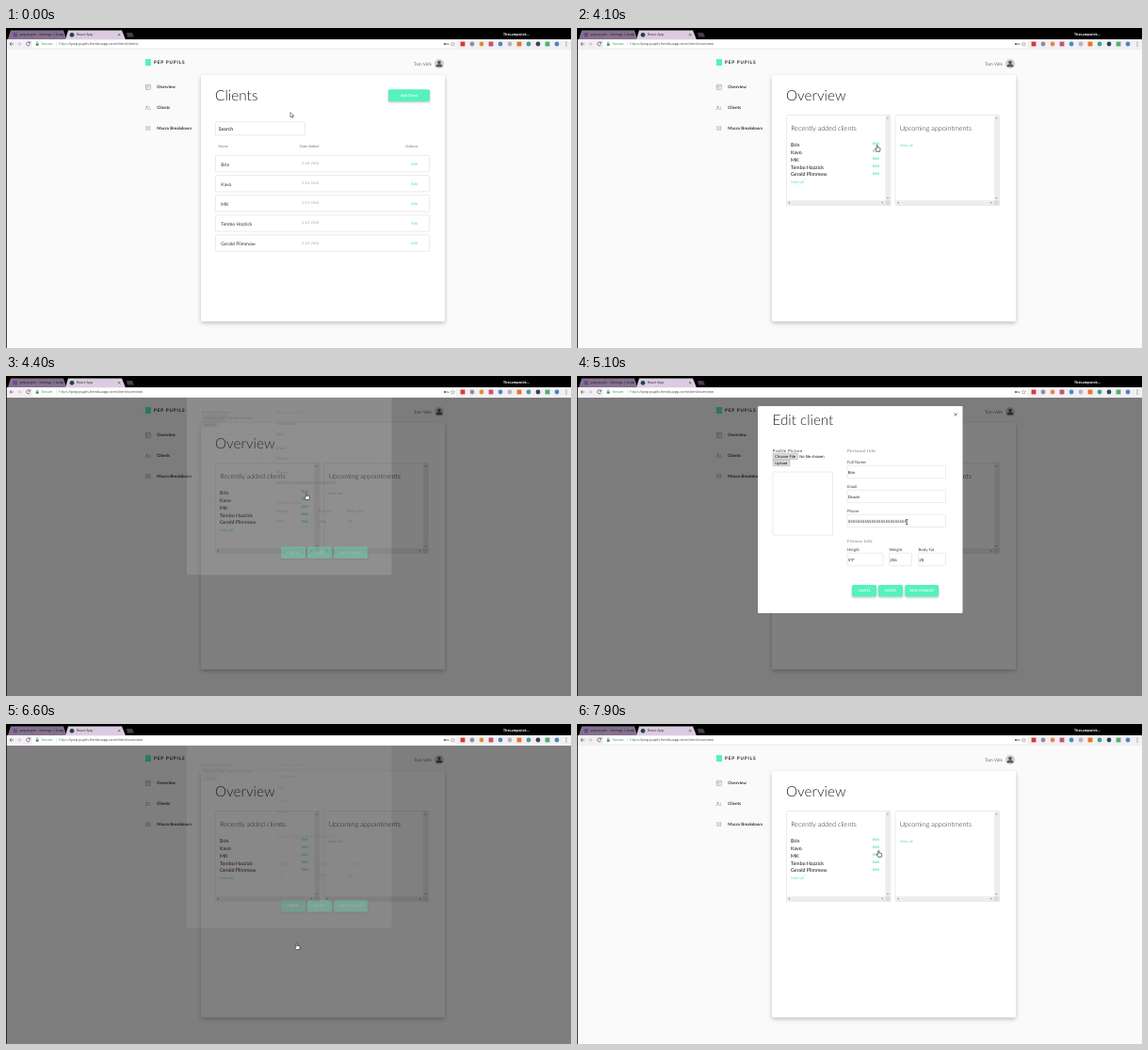
Recreate the animation shown at these times as an HTML page. Size 600x340 px, loop 8000 ms.

```html
<!DOCTYPE html>
<html lang="en">
<head>
<meta charset="utf-8">
<title>Client manager</title>
<style>
  html, body { margin: 0; width: 100%; height: 100%; overflow: hidden; background: #fafafa; }
  svg { display: block; width: 600px; height: 340px; }
  text { font-family: Lato, sans-serif; text-rendering: geometricPrecision; white-space: pre; }
  .ui { font-family: "Open Sans", sans-serif; }
  .native { font-family: "Liberation Sans", Arial, sans-serif; }
</style>
</head>
<body>
<svg id="stage" viewBox="0 0 600 340" xmlns="http://www.w3.org/2000/svg"></svg>
<script>
const TEAL = '#55f2bc', LINK = '#4fe0b4', INK = '#333', LINE = '#e6e6e6';
const LOOP = 8000;

// y is the vertical middle of the capitals
const text = (s, x, y, size, fill = INK, weight = 400, extra = '') =>
  `<text x="${x}" y="${y + size * 0.36}" font-size="${size}" fill="${fill}" font-weight="${weight}" ${extra}>${s}</text>`;
const rect = (x, y, w, h, fill, extra = '') =>
  `<rect x="${x}" y="${y}" width="${w}" height="${h}" fill="${fill}" ${extra}/>`;
const box = (x, y, w, h, fill = '#fff') =>
  rect(x, y, w, h, fill, `stroke="${LINE}" stroke-width=".8" rx=".8"`);
const path = (d, stroke, width = 0.7, fill = 'none') =>
  `<path d="${d}" fill="${fill}" stroke="${stroke}" stroke-width="${width}"/>`;
const circle = (x, y, r, fill) => `<circle cx="${x}" cy="${y}" r="${r}" fill="${fill}"/>`;
const group = (id, body, extra = '') => `<g id="${id}" ${extra}>${body}</g>`;
const middle = 'text-anchor="middle"';

const button = (label, x, y, w, h, size, id = '') =>
  rect(x, y, w, h, TEAL, `id="${id}" rx="1.5" filter="url(#soft)"`) +
  text(label, x + w / 2, y + h / 2, size, '#fff', 700, middle);

const people = [
  ['Brin', '2-28-2018'], ['Kavo', '4-10-2018'], ['MK', '3-13-2018'],
  ['Tembo Hazzick', '3-12-2018'], ['Gerald Plimmow', '3-20-2018']
];

function browser() {
  const extensions = ['#d33a3a', '#8f8f9c', '#e58a3c', '#c0566b', '#3f8fc8', '#b9b3bd', '#e0782c',
    '#3aa58c', '#2b4b52', '#53b06a', '#4c84c4'];
  return rect(0, 0, 600, 12, '#000') +
    path('M2 12L5 2.5H61L64 12Z', 'none', 0, '#85718e') +
    path('M63 12.5L66 2.5H123L127 12.5Z', 'none', 0, '#dccbe0') +
    rect(7.5, 5, 4.5, 4.5, '#6a4a96') + circle(70, 7.3, 2.4, '#21454c') +
    text('pep-pupils - Settings | Kum', 14.5, 7.2, 3.6, '#1d1722', 400, 'class="ui"') +
    text('React App', 75, 7.2, 3.6, '#222', 400, 'class="ui"') +
    path('M58.6 6l2.4 2.4m0-2.4l-2.4 2.4M119 6l2.4 2.4m0-2.4l-2.4 2.4', '#333', 0.5) +
    path('M129 9.5L128 5H134L136 9.5Z', 'none', 0, '#493d4e') +
    text('TheLampwick...', 528, 6.8, 3.6, '#fff', 700, 'class="ui"') +
    rect(0, 12, 600, 11, '#f3eff4') + rect(28, 13, 450, 8.5, '#fff', 'rx="1"') +
    path('M8 17H4m1.8-1.8L4 17l1.8 1.8', '#555') +
    path('M12 17h4m-1.8-1.8L16 17l-1.8 1.8', '#bbb') +
    path('M25.3 15.7a2 2 0 1 0 .2 2M25.6 14.5v1.7h-1.7', '#555') +
    rect(31.8, 16.5, 2.8, 2.2, '#2a9150') + path('M32.4 16.5v-1a.8.8 0 0 1 1.6 0v1', '#2a9150', 0.5) +
    text('Secure', 37.5, 17, 3.8, '#2a9150', 400, 'class="ui"') + rect(53.2, 14.5, 0.4, 5, '#ccc') +
    `<text id="url" class="ui" x="56.3" y="18.4" font-size="3.8" fill="#444"><tspan fill="#2a9150">https</tspan><tspan>://pep-pupils.herokuapp.com/client/</tspan><tspan id="route"></tspan></text>` +
    circle(466, 17, 1.1, '#555') + path('M467 17h3v1', '#555') +
    path('M474.5 14.8l.7 1.5 1.6.2-1.2 1.1.3 1.6-1.4-.8-1.4.8.3-1.6-1.2-1.1 1.6-.2Z', '#666', 0.4) +
    extensions.map((c, i) => i % 3 ? circle(485 + i * 10, 17, 2.4, c) : rect(482.6 + i * 10, 14.6, 4.8, 4.8, c)).join('') +
    [15, 17, 19].map(y => circle(595, y, 0.6, '#666')).join('');
}

function siteFrame() {
  return rect(0, 23, 600, 317, '#fafafa') +
    rect(148, 33, 6, 7, TEAL) +
    text('PEP PUPILS', 157, 36.2, 4.8, '#222', 700, 'letter-spacing=".75"') +
    text('Tam Velk', 452, 38.2, 4.9, '#777', 400, 'text-anchor="end"') +
    circle(460, 38, 5, '#cfcfcf') + circle(460, 36.6, 1.8, '#555') + path('M456.5 41.2a3.5 3 0 0 1 7 0Z', 'none', 0, '#555') +
    path('M148.4 60.3h5v5h-5Zm0 1.7h5m-3.3 0v3.3', '#999', 0.6) +
    path('M148 87v-.8q1.5-1.6 3 0v.8m.7-.8q1-.7 1.8.2v.6', '#999', 0.6) +
    circle(149.5, 83.7, 0.9, '#999') + circle(152.2, 84, 0.7, '#aaa') +
    path('M149 104v5m1.9-5v5m1.9-5v5', '#aaa', 0.8) +
    text('Overview', 160.3, 62.6, 4.5, INK, 700, 'id="overviewLink"') +
    text('Clients', 160.3, 84.7, 4.5, INK, 700) +
    text('Macro Breakdown', 160.3, 106.7, 4.5, INK, 700) +
    rect(207, 50, 259, 261.5, '#fff', 'rx="1.5" filter="url(#card)"');
}

function clientsPage() {
  const rows = people.map(([name, date], i) => {
    const y = 135.5 + i * 21.1;
    return box(222.5, y, 227, 17.3) + text(name, 228.3, y + 9.3, 5.05) +
      text(date, 314, y + 8.3, 3.8, '#aaa') + text('Edit', 430.2, y + 8.6, 4, LINK);
  }).join('');
  return text('Clients', 222, 71.3, 15.4, '#222', 300) +
    button('Add Client', 406, 65.3, 44, 12.7, 3.9) +
    box(222.5, 99.8, 95, 14) + text('Search', 225.8, 107, 5.1, '#444', 700) +
    text('Name', 225.5, 126, 3.9, '#999', 700) + text('Date Added', 312, 126, 3.9, '#999', 700) +
    text('Actions', 424.3, 126, 3.9, '#999', 700) + rows;
}

function panel(x, w, title) {
  const right = x + w - 5.7, arrow = '#777';
  return box(x, 92.5, w, 96) + rect(right, 92.8, 5.4, 90.4, '#ededed') +
    rect(x + 0.3, 183.2, w - 6, 5.1, '#ededed') + rect(right, 183.2, 5.4, 5.1, '#dcdcdc') +
    path(`M${right + 1.6} 96.2l1.1-1.3 1.1 1.3Zm0 84l1.1 1.3 1.1-1.3Z`, 'none', 0, arrow) +
    path(`M${x + 3.5} 184.6l-1.3 1.1 1.3 1.1ZM${right - 3.5} 184.6l1.3 1.1-1.3 1.1Z`, 'none', 0, arrow) +
    text(title, x + 4.7, 106.6, 7.25, '#222', 300);
}

function overviewPage() {
  const list = people.map(([name], i) =>
    text(name, 227, 124.2 + i * 7.8, 5.3, '#222', 500) +
    text('Edit', 314, 122.8 + i * 7.9, 4, LINK, 700)).join('');
  return text('Overview', 222, 71.3, 15.3, '#222', 300) +
    panel(222.5, 110.5, 'Recently added clients') + panel(338, 110.5, 'Upcoming appointments') +
    text('View all', 342.8, 124.2, 4, LINK) +
    group('recent', list + text('View all', 227, 163.2, 4, LINK));
}

function field(label, value, x, y, w) {
  return text(label, x, y, 4.4, '#444') + box(x, y + 4.2, w, 13.4) + text(value, x + 0.7, y + 11.4, 4.3, '#222');
}

function modalBody() {
  const spaced = 'letter-spacing=".35"', native = 'class="native"';
  const grey = (x, y, w, h) => rect(x, y, w, h, '#ddd', 'stroke="#999" stroke-width=".4"');
  return rect(192, 32, 217.5, 220, '#fff', 'rx="1.2"') +
    text('Edit client', 207.5, 46.5, 15.2, '#222', 300) +
    path('M400.6 39.4l3 3m0-3l-3 3', '#333', 0.6) +
    text('Profile Picture', 207.8, 79, 4.3, INK, 400, spaced) +
    grey(208, 82, 26.5, 6.5) + text('Choose File', 210, 85.2, 4.15, '#111', 400, native) +
    text('No file chosen', 236.3, 85.2, 4.15, '#111', 400, native) +
    grey(208, 89.2, 18, 6.3) + text('Upload', 210.3, 92.3, 4.15, '#111', 400, native) +
    box(208, 102, 63.5, 67) +
    text('Personal Info', 287, 79, 4.4, '#999', 700, spaced) +
    field('Full Name:', 'Brin', 287, 91, 104.5) +
    field('Email', 'Drovin', 287, 117, 104.5) +
    field('Phone', '5'.repeat(25), 287, 143, 104.5) +
    text('Fitness Info', 287, 175, 4.4, '#999', 700, spaced) +
    field('Height', '5\'9"', 287, 184, 38) + field('Weight', '206', 331.5, 184, 24) + field('Body Fat', '28', 362.5, 184, 29);
}

const modalButtons = button('CANCEL', 292, 222, 26, 12.5, 3.4, 'cancel') +
  button('DELETE', 320, 222, 26, 12.5, 3.4) + button('SAVE CHANGES', 348.3, 222, 35.7, 12.5, 3.4);

const cursors =
  group('arrow', path('M0 0V5.2L1.3 4.1 2.1 6 3 5.6 2.2 3.8H3.8Z', '#222', 0.5, '#fff')) +
  group('hand', path('M-.6 3.6V.5Q0-.4.6.5V2.6L3 3.1Q3.5 3.3 3.4 4L2.9 6.9H-.4L-2.3 4.2Q-1.7 3.2-.6 4.2Z', '#111', 0.6, '#fff')) +
  group('beam', path('M-1.2-2.5H1.2M0-2.5V2.5M-1.2 2.5H1.2', '#222', 0.6));

document.getElementById('stage').innerHTML = `
  <defs>
    <filter id="card" x="-10%" y="-10%" width="120%" height="120%"><feDropShadow dx="0" dy="2" stdDeviation="2" flood-opacity=".25"/></filter>
    <filter id="soft" x="-20%" y="-30%" width="140%" height="190%"><feDropShadow dx="0" dy="1" stdDeviation="1" flood-opacity=".25"/></filter>
    <clipPath id="viewport"><rect x="0" y="23" width="600" height="317"/></clipPath>
  </defs>` +
  siteFrame() + group('clients', clientsPage()) + group('overview', overviewPage()) +
  rect(0, 23, 600, 317, '#000', 'id="shade"') +
  `<g clip-path="url(#viewport)">${group('modal', group('sheet', modalBody()) + group('actions', modalButtons))}</g>` +
  browser() + rect(0, 12, 0.8, 328, '#111') + group('cursor', cursors);

// Each key is [time, ...values]
function sample(keys, t) {
  const i = keys.findIndex(k => k[0] > t);
  if (i < 0) return keys[keys.length - 1].slice(1);
  if (i === 0) return keys[0].slice(1);
  const a = keys[i - 1], b = keys[i], p = (t - a[0]) / (b[0] - a[0]);
  return a.slice(1).map((v, n) => v + (b[n + 1] - v) * p);
}

const pointer = [[100, 302, 89.5], [1000, 246, 83], [1800, 178, 68], [2100, 169.5, 64.8], [2700, 169.5, 64.8],
  [3500, 288, 122.5], [3600, 288, 122.5], [4100, 318.7, 124.3], [4400, 319, 124.6], [5100, 350.3, 155],
  [6000, 308.7, 233], [6600, 308.7, 233], [7000, 328, 182], [7800, 320.5, 135.5], [7900, 320.4, 134.4]];
const shapes = [[0, 'arrow'], [1900, 'hand'], [2900, 'arrow'], [3900, 'hand'], [4500, 'arrow'], [4800, 'beam'],
  [5300, 'arrow'], [5800, 'hand'], [6700, 'arrow'], [7600, 'hand']];
const shade = [[4200, 0], [4300, 0.25], [4400, 0.5], [6600, 0.5], [6800, 0]];
const sheetKeys = [[4350, 0, -47], [4400, 0.12, -41], [4700, 1, 0], [6300, 1, 0], [6600, 0.07, -35], [6650, 0, -40]];

const $ = id => document.getElementById(id);
const set = (id, name, value) => $(id).setAttribute(name, value);
const show = (id, on) => set(id, 'display', on ? 'inline' : 'none');

function draw(t) {
  const onOverview = t >= 2300;
  show('clients', !onOverview);
  show('overview', onOverview);
  show('recent', t >= 2400);
  $('route').textContent = onOverview ? 'overview' : 'clients';
  set('overviewLink', 'fill', t >= 1900 && t < 2900 ? LINK : INK);

  set('shade', 'opacity', sample(shade, t)[0]);
  const [alpha, dy] = sample(sheetKeys, t);
  show('modal', alpha > 0);
  set('modal', 'transform', `translate(0 ${dy})`);
  set('sheet', 'opacity', alpha);
  set('actions', 'opacity', Math.sqrt(alpha));
  set('cancel', 'fill', t >= 5800 ? '#3fcf9f' : TEAL);

  const shape = shapes.filter(s => s[0] <= t).pop()[1];
  for (const id of ['arrow', 'hand', 'beam']) show(id, id === shape);
  set('cursor', 'transform', `translate(${sample(pointer, t).join(' ')})`);
}

const start = performance.now();
function tick() {
  draw((performance.now() - start) % LOOP);
  requestAnimationFrame(tick);
}
tick();
</script>
</body>
</html>
```
